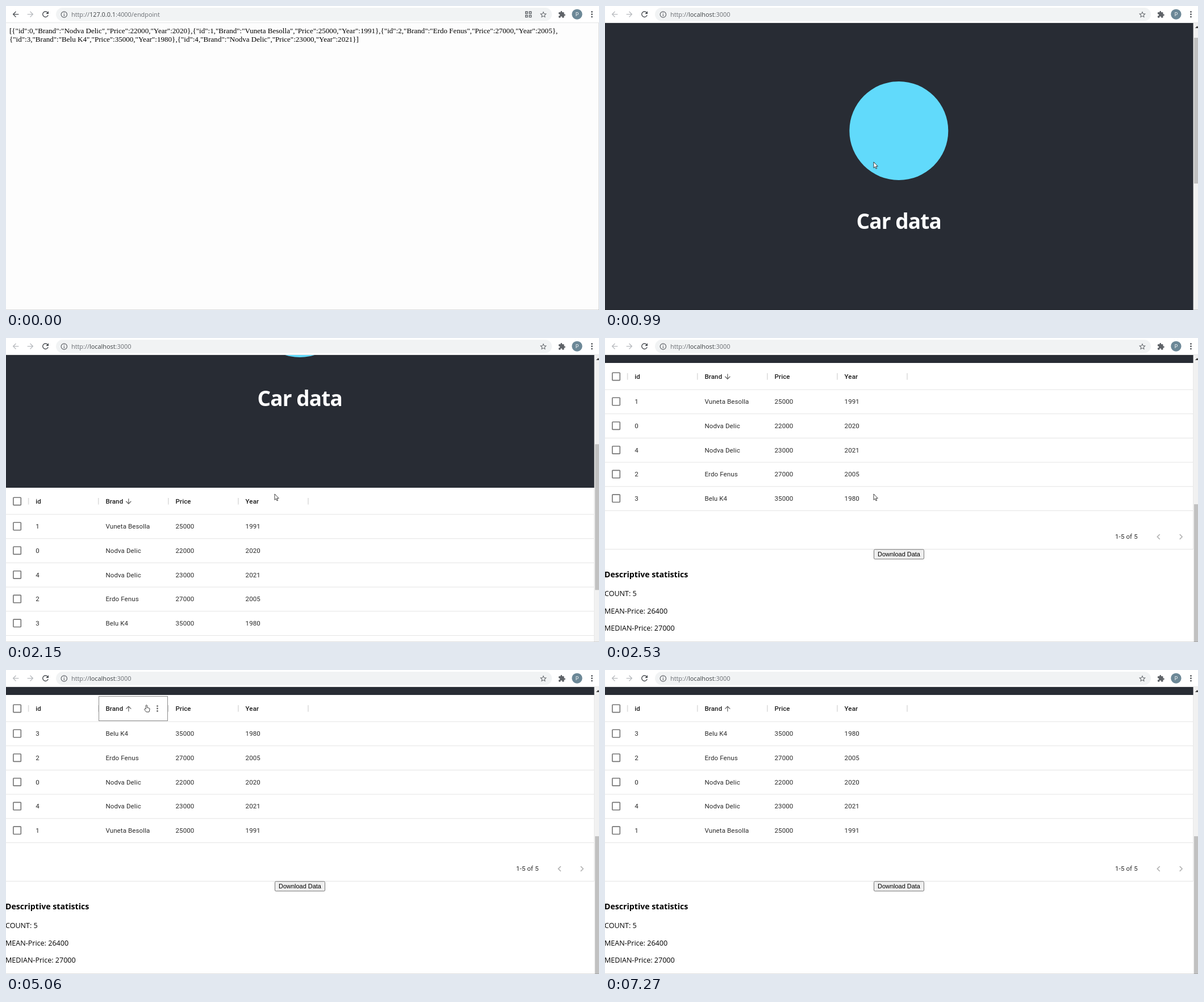
Recreate the animation shown at these times as an HTML page. Size 1044 px wide and 536 px high, loop 7350 ms.

```html
<!DOCTYPE html>
<html lang="en">
<head>
<meta charset="utf-8">
<title>Car data</title>
<style>
html, body { margin: 0; width: 100%; height: 100%; overflow: hidden; background: #fff; }
svg { display: block; width: 1044px; height: 536px; }
text { white-space: pre; }
.ui { font-family: "Open Sans", "Noto Sans", sans-serif; }
.grid { font: 11.5px Roboto, sans-serif; letter-spacing: .12px; fill: #2b2b2b; }
.head { font-weight: 500; fill: #1c1c1c; }
.json { font: 13.07px "Liberation Serif", "Times New Roman", serif; fill: #000; }
.url { font-size: 10.9px; fill: #696d72; }
.host { fill: #3c4043; }
.stat { font-size: 12.55px; fill: #000; }
</style>
</head>
<body>
<svg id="stage" viewBox="0 0 1044 536" xmlns="http://www.w3.org/2000/svg">
  <defs><clipPath id="view"><rect y="30" width="1044" height="506"/></clipPath></defs>
  <rect width="1044" height="536" fill="#fff"/>

  <g id="jsonPage">
    <rect y="30" width="1044" height="506" fill="#fdfdfd"/>
    <text id="json" class="json"></text>
    <path d="M1043.5 30V536" stroke="#dedede"/>
  </g>

  <g id="appPage" clip-path="url(#view)">
    <g id="scroller">
      <rect x="0" y="-500" width="1036" height="544" fill="#282c34"/>
      <circle cx="517.3" cy="-273" r="87" fill="#61dafb"/>
      <text class="ui" x="517.2" y="-100" text-anchor="middle" font-size="37" font-weight="700" letter-spacing="-.9" fill="#fff">Car data</text>
      <g id="table"></g>
      <g class="grid" id="rows"></g>
      <g id="sortArrow" fill="#666"></g>
      <g id="menu" fill="#666">
        <circle cx="266.5" cy="63.6" r="1.4"/><circle cx="266.5" cy="68" r="1.4"/><circle cx="266.5" cy="72.4" r="1.4"/>
      </g>
      <rect id="focus" x="163.5" y="46.5" width="121" height="43" fill="none" stroke="#8c8c8c"/>
      <rect id="button" x="473.5" y="372.8" width="88" height="17" rx="1.8" stroke="#767676"/>
      <text x="517.5" y="385" text-anchor="middle" font-size="10.95" font-family="'Liberation Sans', Arial, sans-serif">Download Data</text>
      <g class="ui">
        <text x="-1" y="421.5" font-size="14.15" font-weight="700">Descriptive statistics</text>
        <text class="stat" x="-1" y="455">COUNT: 5</text>
        <text class="stat" x="-1" y="485.7">MEAN-Price: 26400</text>
        <text class="stat" x="-1" y="516.3">MEDIAN-Price: 27000</text>
      </g>
    </g>
    <rect x="1035.6" y="30" width="8.4" height="506" fill="#f1f1f1"/>
    <path d="M1039 39l3.5-3.8 3.5 3.8z" fill="#404040"/>
    <rect id="thumb" x="1037" width="7" height="257" fill="#c1c1c1"/>
  </g>
  <path d="M0 535.5H1044" stroke="#000" stroke-opacity=".13"/>

  <g id="toolbar">
    <rect width="1044" height="29" fill="#fff"/>
    <path d="M0 29.5H1044" stroke="#e4e5e6"/>
    <rect x="88" y="3" width="873" height="23.5" rx="11.75" fill="#f1f3f4"/>
    <g fill="none" stroke="#5f6368" stroke-width="1.2">
      <circle cx="102.3" cy="15" r="5.2"/>
      <path d="M102.3 14.2V18M102.3 11.8V13"/>
    </g>
    <g id="gridIcon" fill="none" stroke="#5f6368" stroke-width="1.4">
      <path d="M914.7 10h3.4v3.4h-3.4zM921.3 10h3.4v3.4h-3.4zM914.7 16.2h3.4v3.4h-3.4zM921.3 16.2h3.4v3.4h-3.4z"/>
    </g>
    <circle cx="1005.4" cy="14.6" r="9.2" fill="#6c8897"/>
    <text class="ui" x="1005.4" y="18.2" text-anchor="middle" font-size="9.8" fill="#fff">P</text>
    <g fill="#4d5156"><circle cx="1031.5" cy="10.3" r="1.4"/><circle cx="1031.5" cy="14.7" r="1.4"/><circle cx="1031.5" cy="19.1" r="1.4"/></g>
    <text id="url" class="ui url" x="115" y="19"></text>
  </g>

  <g id="cursor" stroke="#111" stroke-width=".8" stroke-linejoin="round" fill="#fff">
    <path id="pointer" d="M0 0V10.5L2.4 8.3 4 12 5.6 11.3 4 7.7H7.3Z"/>
    <path id="hand" d="M3.2 8V1.6a1.2 1.2 0 0 1 2.3 0V5.4l3.4.8q1.3.4 1.1 1.8l-.5 3q-.2 1-.8 2H4.2L1 9.4Q.2 8.1 1.2 7.5T3.2 8Z"/>
  </g>
</svg>
<script>
const LOOP = 7350, APP_START = 990, SCROLL_END = 493;
const $ = id => document.getElementById(id);
const show = (id, on) => $(id).setAttribute("visibility", on ? "inherit" : "hidden");
const move = (id, x, y) => $(id).setAttribute("transform", `translate(${x} ${y})`);

const cars = [
  { id: 0, Brand: "Nodva Delic", Price: 22000, Year: 2020 },
  { id: 1, Brand: "Vuneta Besolla", Price: 25000, Year: 1991 },
  { id: 2, Brand: "Erdo Fenus", Price: 27000, Year: 2005 },
  { id: 3, Brand: "Belu K4", Price: 35000, Year: 1980 },
  { id: 4, Brand: "Nodva Delic", Price: 23000, Year: 2021 }
];
const columns = ["id", "Brand", "Price", "Year"];
const colX = i => 52.3 + 123.1 * i;
const rowY = i => 112 + 42.7 * i;

// Icons on a 24-unit box, centred at x, y
const icons = {
  back: "M20 11H7.83l5.59-5.59L12 4l-8 8 8 8 1.41-1.41L7.83 13H20z",
  reload: "M17.65 6.35A8 8 0 1 0 19.73 14h-2.08A6 6 0 1 1 16.22 7.78L13 11h7V4z",
  star: "M22 9.24l-7.19-.62L12 2 9.19 8.63 2 9.24l5.46 4.73L5.82 21 12 17.27 18.18 21l-1.63-7.03zM12 15.4l-3.76 2.27 1-4.28-3.32-2.88 4.38-.38L12 6.1l1.71 4.04 4.38.38-3.32 2.88 1 4.28z",
  puzzle: "M20.5 11H19V7c0-1.1-.9-2-2-2h-4V3.5a2.5 2.5 0 0 0-5 0V5H4a2 2 0 0 0-2 2v3.8h1.5a2.7 2.7 0 0 1 0 5.4H2V20c0 1.1.9 2 2 2h3.8v-1.5a2.7 2.7 0 0 1 5.4 0V22H17a2 2 0 0 0 2-2v-4h1.5a2.5 2.5 0 0 0 0-5z",
  chevron: "M15.41 7.41L14 6l-6 6 6 6 1.41-1.41L10.83 12z",
  arrow: "M4 12l1.41 1.41L11 7.83V20h2V7.83l5.58 5.59L20 12l-8-8z"
};
const icon = (name, x, y, size, fill, turn = 0, id = "") =>
  `<path ${id && `id="${id}"`} d="${icons[name]}" fill="${fill}" fill-rule="evenodd" transform="translate(${x} ${y}) rotate(${turn}) scale(${size / 24}) translate(-12 -12)"/>`;

const json = cars.map(c => JSON.stringify(c));
$("json").innerHTML =
  `<tspan x="6" y="48">[${json.slice(0, 3).join(",")},</tspan><tspan x="6" y="63">${json.slice(3).join(",")}]</tspan>`;

$("toolbar").insertAdjacentHTML("beforeend",
  icon("back", 17, 14.6, 16, "#4d5156", 0, "back") +
  icon("back", 43, 14.6, 16, "#b9bcc0", 180) +
  icon("reload", 69.5, 14.6, 16.5, "#4d5156") +
  icon("star", 946, 15.2, 14.4, "#5f6368") +
  icon("puzzle", 978.6, 15, 13.6, "#5f6368"));

const line = y => `<path d="M0 ${y}H1036" stroke="#e4e4e4"/>`;
const checkbox = y => `<rect x="12.9" y="${y - 6.7}" width="13.4" height="13.4" rx=".9" fill="none" stroke="#757575" stroke-width="1.64"/>`;

function buildTable() {
  let out = `<rect y="44" width="1036" height="500" fill="#fff"/>` + line(91) + line(372.4) + checkbox(67.9);
  for (let i = 0; i < 5; i++) {
    out += line(133.7 + 42.7 * i) + checkbox(rowY(i));
    out += `<rect x="${38.8 + 123.1 * i}" y="62" width="1.6" height="11.6" fill="#dcdcdc"/>`;
  }
  out += `<path d="M1035.5 44V372" stroke="#e4e4e4"/>`;
  columns.forEach((name, i) => out += `<text class="grid head" x="${colX(i)}" y="72">${name}</text>`);
  out += `<text class="grid" x="898" y="354.3">1-5 of 5</text>`;
  $("table").innerHTML = out +
    icon("chevron", 974.5, 350.5, 19.7, "#b5b5b5") + icon("chevron", 1014, 350.5, 19.7, "#b5b5b5", 180);
}
buildTable();

let shownOrder = null;
function setOrder(order) {
  if (order === shownOrder) return;
  shownOrder = order;
  const list = [...cars];
  if (order) list.sort((a, b) => order * a.Brand.localeCompare(b.Brand));
  $("rows").innerHTML = list.map((car, r) => columns.map((name, c) =>
    `<text x="${colX(c)}" y="${rowY(r) + 4.2}">${car[name]}</text>`).join("")).join("");
  $("sortArrow").innerHTML = icon("arrow", 215.8, 68.2, 14.8, "#666", order < 0 ? 180 : 0);
}

// Wheel positions, held until the next one
const wheel = [[0, 0], [1750, 5], [1850, 17.6], [1920, 68], [2000, 140], [2070, 212], [2150, 273],
  [2230, 291], [2380, 355], [2460, 447], [2530, SCROLL_END]];
const scrollAt = t => wheel.filter(k => t >= k[0]).pop()[1];

// Pointer strokes: start, end, number of steps, from, to
const strokes = [
  [70, 600, 8, [957, 502], [473, 275]],
  [2690, 3150, 7, [454, 258], [243, 52]],
  [5060, 5760, 10, [243, 61], [517, 388]],
  [5840, 5840, 1, [518, 389], [518, 389]],
  [6490, 7050, 8, [528, 394], [990, 536]]
];
function cursorAt(t) {
  const s = strokes.filter(k => t >= k[0]).pop();
  if (!s || t >= 7050) return null;
  const [a, b, n, from, to] = s;
  const gap = n > 1 ? (b - a) / (n - 1) : 1;
  const step = Math.min(n - 1, Math.floor((t - a) / gap + .1));
  const p = n > 1 ? step / (n - 1) : 1;
  const e = p * p * (3 - 2 * p);
  return from.map((v, i) => v + (to[i] - v) * e);
}

function draw(t) {
  const app = t >= APP_START;
  show("jsonPage", !app);
  show("gridIcon", !app);
  show("appPage", app);
  $("back").setAttribute("fill", app ? "#b9bcc0" : "#4d5156");
  const url = app ? ["localhost", ":3000"] : ["127.0.0.1", ":4000/endpoint"];
  if ($("url").dataset.host !== url[0]) {
    $("url").dataset.host = url[0];
    $("url").innerHTML = `http://<tspan class="host">${url[0]}</tspan>${url[1]}`;
  }

  const s = scrollAt(t);
  move("scroller", 0, SCROLL_END - s);
  $("thumb").setAttribute("y", 56 + s * .481);

  const pos = cursorAt(t);
  const hover = app && s === SCROLL_END && !!pos && pos[0] > 160 && pos[0] < 285 && pos[1] < 90;
  setOrder(t < 3460 ? -1 : t < 4180 ? 0 : 1);
  $("sortArrow").setAttribute("opacity", t < 3460 || t >= 4260 ? 1 : t < 3530 || t >= 4180 ? .75 : .5);
  show("menu", hover);
  show("focus", t >= 3380 && t < 7270);

  const over = t >= 5760 && t < 6490;
  const pressed = t >= 6090 && t < 6240;
  $("button").setAttribute("fill", pressed ? "#f5f5f5" : over ? "#e5e5e5" : "#efefef");

  show("cursor", !!pos);
  if (pos) move("cursor", pos[0], pos[1]);
  show("pointer", !hover);
  show("hand", hover);
}

const begin = performance.now();
function tick() {
  draw((performance.now() - begin) % LOOP);
  requestAnimationFrame(tick);
}
tick();
</script>
</body>
</html>
```
